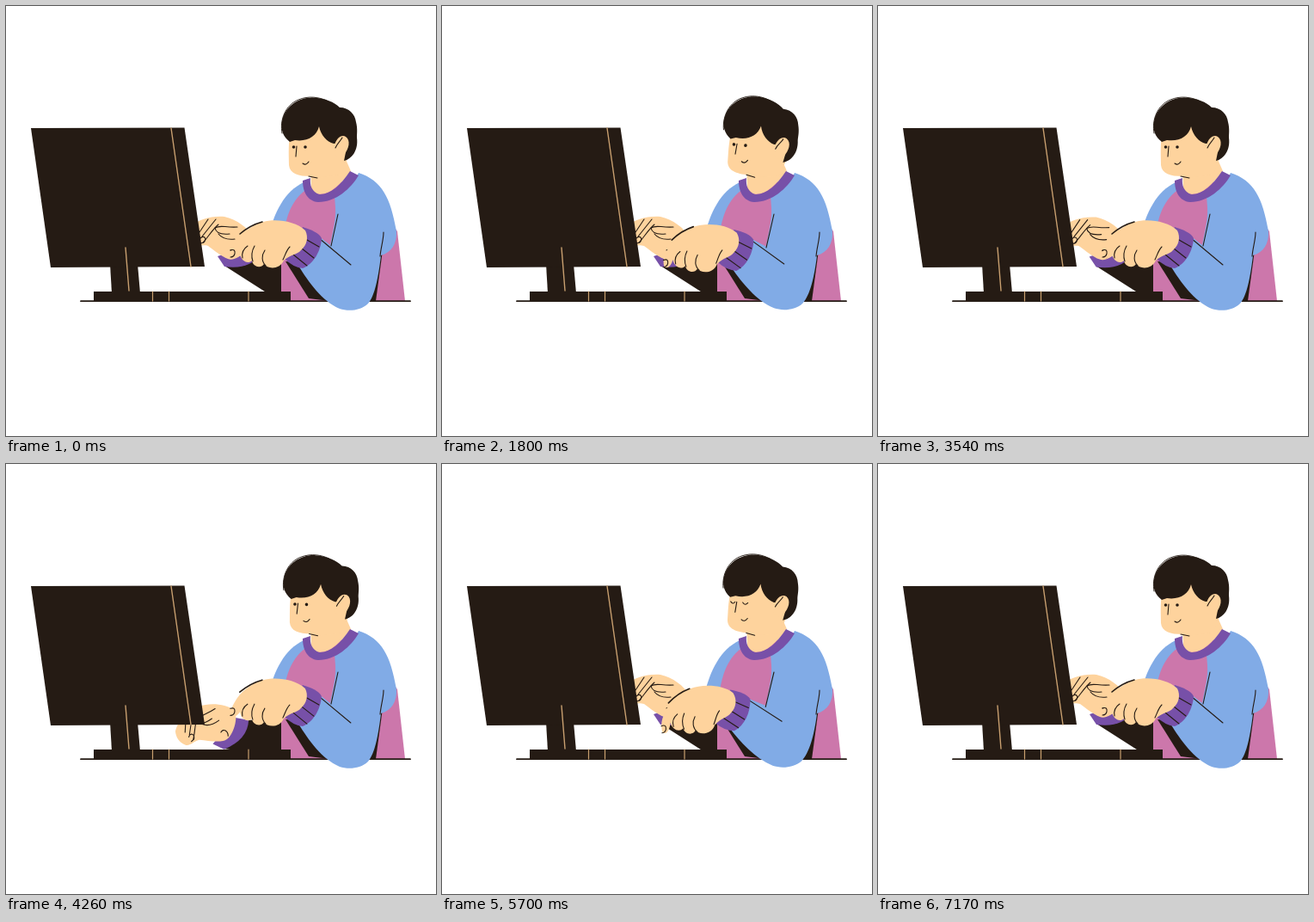
Write an HTML page with a canvas that moves like this. It is 500x500 px and loops after 7.2 s.

```html
<!DOCTYPE html>
<html lang="en">
<head>
<meta charset="utf-8">
<title>Typing at the desk</title>
<style>
html, body { margin: 0; width: 100%; height: 100%; overflow: hidden; background: #fff; }
canvas { display: block; width: 100vw; height: 100vh; }
</style>
</head>
<body>
<canvas id="stage" width="500" height="500"></canvas>
<script>
const ctx = document.getElementById('stage').getContext('2d');
const LOOP = 3600;
const INK = '#251b14', SKIN = '#fed39d', BLUE = '#81abe6', PINK = '#cc77ab',
  PURPLE = '#7750a8', TAN = '#c9a070';

// [time, lowered amount] for each hand
const NEAR = [[0, 0], [645, 0], [900, 1], [1160, 0], [1420, 1], [1690, 0],
  [1980, 1], [2250, 0], [2470, 1], [2690, 0], [LOOP, 0]];
const FAR = [[0, 0], [220, 1], [440, 0], [660, 1], [960, 0], [2500, 0],
  [2790, 1], [3050, 0], [3310, 1], [3570, 0], [LOOP, 0]];

const mix = (a, b, k) => a + (b - a) * k;

function pose(keys, t) {
  let i = 1;
  while (i < keys.length - 1 && t > keys[i][0]) i++;
  const [t0, a] = keys[i - 1], [t1, b] = keys[i];
  return mix(a, b, (1 - Math.cos(Math.PI * (t - t0) / (t1 - t0))) / 2);
}

function fill(d, color) {
  ctx.fillStyle = color;
  ctx.fill(new Path2D(d));
}

function line(d, color = INK, width = 1.1) {
  ctx.strokeStyle = color;
  ctx.lineWidth = width;
  ctx.stroke(new Path2D(d));
}

// Rotate about (x, y), then shift, while drawing
function turned(x, y, angle, dx, dy, draw) {
  ctx.save();
  ctx.translate(x + dx, y + dy);
  ctx.rotate(angle);
  ctx.translate(-x, -y);
  draw();
  ctx.restore();
}

function farArm(k) {
  // the wrist bends later than the arm drops
  const angle = -0.53 * k * k, dx = -10 * k, dy = 20 * k;
  const c = Math.cos(angle), s = Math.sin(angle);
  const at = (x, y) => {
    const u = x - 275, v = y - 290;
    return `${275 + dx + u * c - v * s} ${290 + dy + u * s + v * c}`;
  };
  fill(`M${at(254, 302)} L${at(286, 282)} L320 298 L320 336 L${mix(304, 276, k)} 334 Z`, INK);
  turned(275, 290, angle, dx, dy, () => {
    fill('M284 278 L246 291 L254 303 Q284 307 296 288 Z', PURPLE);
    fill('M216 256 C224 248 238 244 254 245 C268 248 282 258 288 270 ' +
      'C286 282 268 298 258 294 C250 291 242 284 235 279 C230 277 222 280 218 276 ' +
      'C213 270 213 262 216 256 Z', SKIN);
    line('M225 263 L235 248 M228 268 L244 248 M229 275 C235 269 239 261 247 254');
    line('M243 258 C249 254 255 258 269 257 M243 258 C244 264 250 266 260 265');
    line('M247 265 C251 270 257 272 266 271 M226 270 C230 266 234 270 230 275 L226 276');
    line('M261 284 C266 281 269 287 266 292');
  });
}

function torso() {
  fill('M346 205 C324 216 312 238 304 272 L324 274 L350 222 Z', BLUE);
  fill('M347 215 C331 228 326 245 322 268 L318 305 L320 343 L464 343 ' +
    'L455 262 L410 200 Z', PINK);
  fill('M325 297 L342 298 L376 343 L352 340 Z', INK);
  fill('M438 284 L430 343 L412 343 Z', INK);
  fill('M354 185 L355 212 Q361 224 378 215 Q392 205 401 192 L394 176 Z', SKIN);
}

function nearArm(k) {
  const p = (x, y, dx, dy) => `${x + dx * k} ${y + dy * k}`;
  fill('M382 221 C396 214 405 205 410 194 C437 203 447 222 454 262 ' +
    'C455 276 448 287 436 290 ' +
    `C433 315 ${p(429, 337, -3, -2)} ${p(421, 346, -5, -1)} ` +
    `C${p(412, 355, -6, -2)} ${p(397, 355, -6, -2)} ${p(388, 352, -6, -2)} ` +
    `C${p(367, 343, -6, -2)} ${p(352, 321, -9, 3)} ${p(340, 302, -10, 8)} ` +
    `L${p(364, 268, -16, 7)} L${p(377, 278, -1, 5)} C380 262 384 248 383 234 Z`, BLUE);
  line(`M386 242 L${p(378, 279, -3, 6)}`);
  line(`M${p(364, 270, -17, 5)} L${p(401, 301, -10, -3)}`);
  line('M439 263 C439 272 436 280 435 291');

  turned(352, 280, -0.175 * k, -13 * k, 8 * k, () => {
    fill('M345 257 C355 260 364 264 367 270 C366 286 357 300 345 305 ' +
      'Q334 304 324 294 Z', PURPLE);
    line('M350 272 L364 280 M344 282 L358 293 M334 289 L350 302');
    fill('M348 261 C337 250 313 247 299 251 C283 256 272 266 267 275 ' +
      `C263 282 260 288 ${261 + k} ${291 + 12 * k} ` +
      `C${264 + k} ${295 + 12 * k} ${269 + k} ${293 + 10 * k} 272 288 ` +
      'C273 296 281 301 286 296 C287 303 296 306 300 300 ' +
      'C304 306 318 307 323 296 C330 289 339 289 343 284 C350 278 352 269 348 261 Z', SKIN);
    line('M281 279 C275 283 274 288 275 293 M289 279 C285 286 285 291 287 297');
    line('M301 284 C297 290 297 297 302 302 M330 280 C326 284 325 289 322 295');
    line('M272 265 C279 259 287 254 298 251', INK, 1.6);
    line(`M261 ${284 + 12 * k} q6 -2 5 4 q-1 4 -5 4`);
  });
}

function collar() {
  fill('M345 203 C345 215 350 227 363 228 C384 228 401 212 410 197 L400 192 ' +
    'C389 209 376 220 364 219 C356 216 353 209 354 200 Z', PURPLE);
}

function head(sway, closed) {
  turned(372, 213, 0.087 * sway, 0.6 * sway, 0, () => {
    fill('M330 150 C328 165 329 176 329 185 C330 195 340 198 354 198 ' +
      'L362 200 L390 196 L397 176 L390 145 L350 130 Z', SKIN);
    fill('M330 158 C322 152 319 143 321 134 C324 117 340 106 357 106.5 ' +
      'C371 107 382 112 388 118 C399 118 406 126 407 135 C409 143 408 148 408 153 ' +
      'C410 168 402 178 393 180 L395 170 L386 160 L381 160 C373 158 366 150 364 140 ' +
      'C361 152 350 158 336 156 Z', INK);
    line('M321 148 C318 132 325 115 340 109 C352 104 364 106 373 110', INK, 0.9);
    fill('M382 162 C384 154 390 149 395 152 C401 156 399 166 393 173 ' +
      'C389 178 383 176 381 170 Z', SKIN);
    line('M383 165 C385 160 389 157 391 153');
    line('M338 163 L337 175 M345 183 Q349 186 352 181 M352 198 L362 200');
    if (closed) {
      line('M331 163 q3 4 5 0 M345 163 q3 4 6 0');
    } else {
      ctx.fillStyle = INK;
      for (const x of [334.5, 348]) {
        ctx.beginPath();
        ctx.arc(x, 164, 1.8, 0, 7);
        ctx.fill();
      }
    }
  });
}

function desk() {
  line('M87 343.2 H470', INK, 1.8);
  fill('M102 332 H331 V343 H102 Z', INK);
  line('M170.5 332 V343 M189.5 332 V343 M282 332 V343', TAN, 1.2);
}

function monitor() {
  fill('M121 300 H153 L156 334 H123 Z', INK);
  fill('M29 142 L207.5 141.5 L231 303 L52 304 Z', INK);
  line('M192 142 L215 303 M139 281 L143 331', TAN, 1.4);
}

function draw(t) {
  const near = pose(NEAR, t), far = pose(FAR, t);
  const sway = (1 - Math.cos(2 * Math.PI * t / LOOP)) / 2;
  ctx.fillStyle = '#fff';
  ctx.fillRect(0, 0, 500, 500);
  ctx.lineCap = ctx.lineJoin = 'round';
  torso();
  farArm(far);
  desk();
  head(sway, t > 2010 && t < 2190);
  nearArm(near);
  collar();
  monitor();
}

const start = performance.now();
function tick() {
  draw((performance.now() - start) % LOOP);
  requestAnimationFrame(tick);
}
tick();
</script>
</body>
</html>
```
